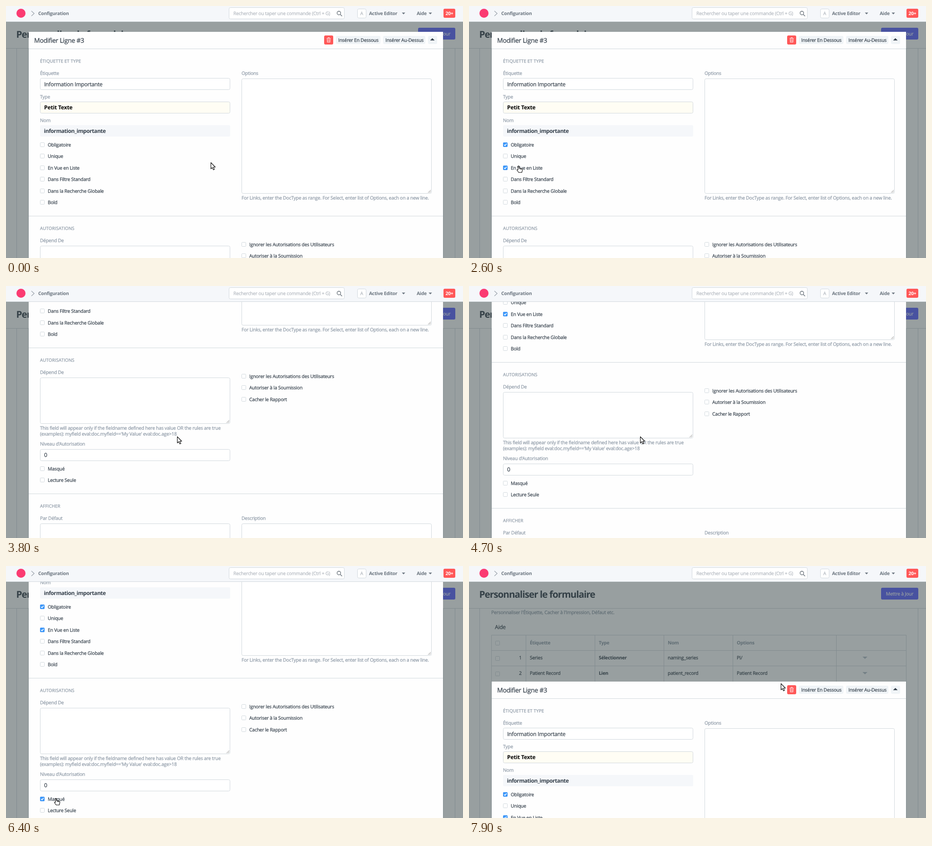
Recreate the animation shown at these times as an HTML page. Size 1007 px wide and 556 px high, loop 8 s.

```html
<!DOCTYPE html>
<html lang="fr">
<head>
<meta charset="utf-8">
<title>Modifier Ligne</title>
<style>
html, body { margin: 0; width: 100%; height: 100%; overflow: hidden; background: #99a0a1; }
svg { display: block; width: 100vw; height: 100vh; }
text { font: 10.4px "Open Sans", "Noto Sans", sans-serif; letter-spacing: -.021em; color: #36414c; fill: currentColor; stroke: currentColor; stroke-width: .25px; text-rendering: geometricPrecision; white-space: pre; }
.grey { color: #8d99a6; }
.nav { color: #6c7680; }
.hint { color: #b3b9c0; }
.white { color: #fff; }
.black { color: #000; }
.bold { font-weight: 700; letter-spacing: -.03em; stroke: none; }
.section { font-size: 9.8px; letter-spacing: .01em; }
.field { font-size: 12.1px; }
.black { letter-spacing: -.015em; }
.static { letter-spacing: -.04em; }
.modal-title { font-size: 14.1px; }
.page-title { font-size: 20.8px; letter-spacing: -.05em; }
.box { fill: #fff; stroke: #d1d8dd; }
.line { stroke: #d1d8dd; fill: none; }
.tick { fill: none; stroke: #fff; stroke-width: 1.6; visibility: hidden; }
.press .box { fill: #d9dcdf; stroke: #9aa2a9; }
.on .box { fill: #3b99fc; stroke: #3b8ff0; }
.on .tick { visibility: visible; }
</style>
</head>
<body>
<svg id="stage" viewBox="0 0 1007 556" preserveAspectRatio="none"></svg>
<script>
// y is the vertical middle of the capitals; baselines sit on whole pixels
const text = (x, y, s, cls = '', size = 10.4, anchor = 'start') =>
  `<text x="${x}" y="${Math.round(y + size * .36)}" class="${cls}" text-anchor="${anchor}">${s}</text>`;
const rect = (x, y, w, h, fill, r = 3) =>
  `<rect x="${x}" y="${y}" width="${w}" height="${h}" rx="${r}" fill="${fill}"/>`;
const box = (x, y, w, h, r = 3, style = '') =>
  `<rect x="${x + .5}" y="${y + .5}" width="${w}" height="${h}" rx="${r}" class="box" style="${style}"/>`;
const line = d => `<path d="${d}" class="line"/>`;
const caret = (x, y, w, h, fill) => `<path d="M${x - w} ${y}h${2 * w}l${-w} ${h}z" fill="${fill}"/>`;
const area = (x, y, w, h) => box(x, y, w, h) +
  `<path d="M${x + w - 7} ${y + h - 1}l6-6m-3 6l3-3" stroke="#777" stroke-width=".8"/>`;
const square = (x, y) => box(x, y, 9, 9, 1);
const check = (x, y, label, id) =>
  `<g id="${id}">${square(x, y - 5)}<path d="M${x + 2.3} ${y}l2 2.1 3.600-4.400" class="tick"/></g>` +
  text(x + 17, y, label);
const checks = (x, y, labels) =>
  labels.map((s, i) => check(x, y + Math.floor(25.5 * i), s, s.replace(/\W/g, ''))).join('');
const label = (x, y, s) => text(x, y, s, 'grey');
const section = (y, s) => text(75, y, s, 'grey section', 9.8);

function navbar() {
  return rect(0, 0, 1007, 35, '#f5f7fa', 0) + line('M0 34.5H1007') +
    '<circle cx="33" cy="16" r="10" fill="#fb3b72"/>' +
    '<path d="M56 11l6 5.500-6 5.500" fill="none" stroke="#a3abb3" stroke-width="1.500"/>' +
    text(71, 16.5, 'Configuration', 'nav bold') +
    box(491, 3, 254, 25) +
    text(501, 16.5, 'Rechercher ou taper une commande (Ctrl + G)', 'hint') +
    '<g fill="none" stroke="#5f6972" stroke-width="1.300"><circle cx="733.500" cy="15.500" r="4"/><path d="M736.500 18.500l4 4"/></g>' +
    box(774, 6, 19, 20) + text(783.8, 16.5, 'A', 'hint', 10.4, 'middle') +
    text(800, 16, 'Active Editor', 'nav bold') + caret(876, 14.5, 3.7, 4, '#6c7680') +
    text(905, 16, 'Aide', 'nav bold') + caret(935, 14.5, 3.7, 4, '#6c7680') +
    rect(964, 6, 26, 20, '#ff5858') + text(977, 16, '20+', 'white bold', 10.4, 'middle');
}

function table() {
  const cols = [134, 286, 438, 590];
  const row = (y, n, cells) => square(58, y - 3) + text(116, y, n, '', 10.4, 'end') +
    cells.map((s, i) => text(cols[i], y, s, i == 1 ? 'bold' : '')).join('') +
    caret(872.5, y - 2, 5.5, 5, '#b8c2cc');
  return line('M23.5 -400V1500M989.5 -400V1500') +
    text(49, 102, "Personnaliser l'Étiquette, Cacher à l'Impression, Défaut etc.", 'grey') +
    text(57, 134.5, 'Aide', 'field', 12.1) +
    line('M49.5 1500V152.5H963.5V1500M49.5 186.5H963.5M49.5 220.5H963.5') +
    line([125, 277, 429, 581, 809].map(x => `M${x}.5 152V400`).join('')) +
    square(58, 165) +
    ['Étiquette', 'Type', 'Nom', 'Options'].map((s, i) => text(cols[i], 169, s, 'grey bold')).join('') +
    row(202, 1, ['Series', 'Sélectionner', 'naming_series', 'PI/']) +
    row(236, 2, ['Patient Record', 'Lien', 'patient_record', 'Patient Record']);
}

function pageHead() {
  return rect(0, 35, 1007, 58, '#fff', 0) + line('M0 93.5H1007') +
    text(22.5, 63, 'Personnaliser le formulaire', 'bold page-title', 20.8) +
    rect(908, 48, 82, 26, '#5e64ff') + text(949, 61, 'Mettre à Jour', 'white', 10.4, 'middle');
}

function modal() {
  const chip = '#f0f4f7';
  return rect(50, 57, 913, 1200, '#fefefe', 0) +
    text(62, 75.5, 'Modifier Ligne #3', 'modal-title', 14.1) +
    rect(701, 65, 20, 20, '#ff5858') +
    '<path d="M706.500 71.500h9M709.500 71v-1.500h3v1.500M707.500 72.500l.5 7.500h6l.5-7.500M709.700 73v6M712.300 73v6" fill="none" stroke="#fff" stroke-opacity=".85"/>' +
    rect(727, 66, 98, 18, chip) + text(732, 75, 'Insérer En Dessous') +
    rect(831, 66, 93, 18, chip) + text(836, 75, 'Insérer Au-Dessus') +
    rect(930, 66, 20, 18, chip) + caret(939.5, 76, 5, -5, '#36414c') +
    line('M50 94.5H963M50 463.5H963M50 785.5H963') +

    section(121.5, 'ÉTIQUETTE ET TYPE') +
    label(75, 148, 'Étiquette') + box(75, 159, 418, 25) +
    text(84, 172.5, 'Information Importante', 'field', 12.1) +
    label(75, 200, 'Type') + box(75, 211, 418, 25, 3, 'fill:#fffdf4') +
    text(84, 224, 'Petit Texte', 'field bold black', 12.1) +
    label(75, 252, 'Nom') + rect(75, 263, 419, 25, '#f5f7fa') +
    text(83.5, 275.5, 'information_importante', 'field bold static', 12.1) +
    checks(75, 306, ['Obligatoire', 'Unique', 'En Vue en Liste', 'Dans Filtre Standard', 'Dans la Recherche Globale', 'Bold']) +
    label(519, 148, 'Options') + area(519, 160, 418, 253) +
    label(519, 423.5, 'For Links, enter the DocType as range. For Select, enter list of Options, each on a new line.') +

    section(490.5, 'AUTORISATIONS') +
    label(75, 517.5, 'Dépend De') + area(75, 529, 418, 101) +
    label(75, 640, 'This field will appear only if the fieldname defined here has value OR the rules are true') +
    label(75, 653.5, "(examples): myfield eval:doc.myfield=='My Value' eval:doc.age&gt;18") +
    label(75, 675.5, "Niveau d'Autorisation") + box(75, 687, 418, 25) + text(84, 700, '0', 'field', 12.1) +
    checks(75, 730, ['Masqué', 'Lecture Seule']) +
    checks(519, 526, ['Ignorer les Autorisations des Utilisateurs', 'Autoriser à la Soumission', 'Cacher le Rapport']) +

    section(812, 'AFFICHER') +
    label(75, 839, 'Par Défaut') + area(75, 851, 418, 101) +
    label(519, 839, 'Description') + area(519, 851, 418, 101);
}

const $ = id => document.getElementById(id);
$('stage').innerHTML =
  rect(0, 0, 1007, 556, '#fff', 0) +
  `<g id="page"><g transform="translate(0 -198)">${table()}</g></g>` + pageHead() +
  rect(0, 35, 1007, 521, 'rgba(51,65,67,.5)', 0) +
  `<g id="modal">${modal()}</g>` + navbar() +
  `<g id="cursor" fill="#fff" stroke="#000" stroke-width="1.100" stroke-linejoin="round">
    <path id="arrow" d="M.5 .5v13.800l3.100-2.900 2.300 5 2.400-1-2.300-4.900h4.200z"/>
    <path id="hand" d="M3 9.500V1.700q1.200-1.600 2.400 0V6l6 1q1.700.6 1.300 2.700l-1.300 5.600H4.500L.8 10.200q-.4-2 2.200-.7zM7.500 6.500v2M10 7v2"/>
  </g>`;

const LOOP = 8000;
const scrollKeys = [[3000, 0], [3200, -66], [3800, -327], [4000, -333], [4400, -333], [4500, -325],
  [4700, -295], [5300, -216], [7100, -216], [7700, 198]];
const cursorKeys = [[0, 451, 345], [900, 106, 304], [1100, 106, 304], [1600, 105, 352], [1999, 105, 352],
  [2000, 190, 378], [2300, 190, 378], [2500, 105, 352], [2600, 105, 352], [2900, 377, 332],
  [5000, 377, 332], [5300, 325, 368], [6200, 106, 508], [6300, 106, 510], [6400, 106, 512],
  [6600, 106, 512], [7000, 504, 407], [7899, 504, 407], [7900, 687, 259]];
// id, press time, check time
const clicks = [['Obligatoire', 900, 1000], ['EnVueenListe', 2500, 2600], ['Masqu', 6200, 6300]];

function sample(keys, t, ease = p => p) {
  const i = keys.findIndex(k => k[0] > t);
  if (i == 0) return keys[0].slice(1);
  if (i < 0) return keys[keys.length - 1].slice(1);
  const [t0, ...a] = keys[i - 1], [t1, ...b] = keys[i];
  const p = ease((t - t0) / (t1 - t0));
  return a.map((v, j) => v + (b[j] - v) * p);
}
const smooth = p => p * p * (3 - 2 * p);

function draw(now) {
  const t = Math.floor(now % LOOP / 100) * 100;
  const [scroll] = sample(scrollKeys, t);
  const [x, y] = sample(cursorKeys, t, smooth).map(Math.round);
  for (const id of ['page', 'modal'])
    $(id).setAttribute('transform', `translate(0 ${Math.round(scroll)})`);
  $('cursor').setAttribute('transform', `translate(${x} ${y})`);
  $('hand').style.display = x < 140 ? '' : 'none';
  $('arrow').style.display = x < 140 ? 'none' : '';
  for (const [id, press, on] of clicks)
    $(id).setAttribute('class', t >= on ? 'on' : t >= press ? 'press' : '');
  requestAnimationFrame(draw);
}
draw(performance.now());
</script>
</body>
</html>
```
